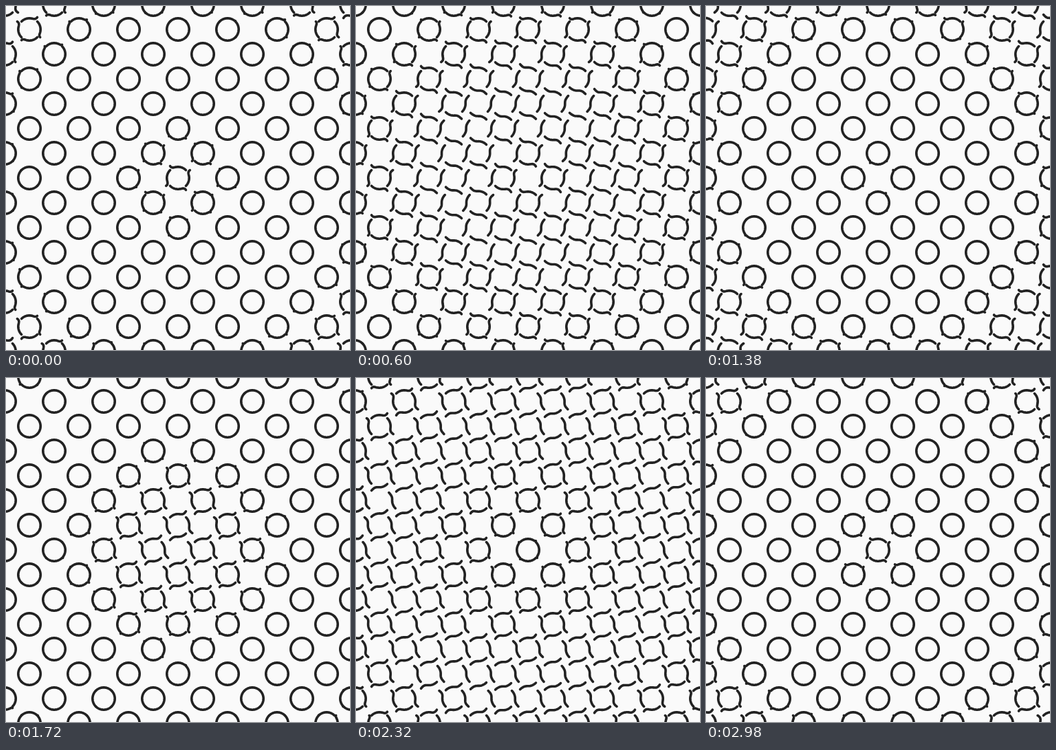
An HTML page with a canvas for the animation above (3 s loop, 500 by 500 pixels).

```html
<!DOCTYPE html>
<html lang="en">
<head>
<meta charset="utf-8">
<title>Rings and waves</title>
<style>
  html, body { margin: 0; width: 100%; height: 100%; overflow: hidden; background: #fafafa; }
  canvas { display: block; width: 500px; height: 500px; }
</style>
</head>
<body>
<canvas id="stage" width="500" height="500"></canvas>
<script>
const ctx = document.getElementById('stage').getContext('2d');
const SIZE = 500, MID = SIZE / 2;
const LOOP = 3000, HALF = LOOP / 2, STEP = 20;
const CELL = 36, GAP = CELL / 2, RADIUS = 16.2;
const FLIP = 500;     // ms one point takes to flip
const SWEEP = 750;    // ms between the two ends of a strand
const SPREAD = 2.8;   // ms of delay per pixel from the middle
const LEAD = 40;
const PARTS = 24;

const smooth = x => {
  x = Math.min(1, Math.max(0, x));
  return x * x * (3 - 2 * x);
};

// +1: bent round an even cell, -1: bent round its odd neighbour
function bend(ms) {
  const x = (((ms + HALF / 2) % LOOP) + LOOP) % LOOP;
  const side = x < HALF ? 1 : -1;
  const since = x % HALF - HALF / 2;
  return side * (1 - 2 * smooth(since / FLIP + 0.5));
}

// Four strands round every even cell
const strands = [];
for (let i = -8; i <= 8; i++) {
  for (let j = -8; j <= 8; j++) {
    if ((i + j) % 2) continue;
    for (let k = 0; k < 4; k++) {
      const turn = k * Math.PI / 2;
      const x = i * CELL, y = j * CELL;
      const dist = Math.hypot(x + GAP * Math.sin(turn), y - GAP * Math.cos(turn));
      strands.push({ x, y, turn, delay: SPREAD * (dist - GAP) });
    }
  }
}

function drawStrand({ x, y, turn, delay }, t) {
  const at = t + LEAD - delay;
  const base = -GAP + (GAP - RADIUS) * bend(at - SWEEP / 2);
  ctx.save();
  ctx.translate(MID + x, MID + y);
  ctx.rotate(turn);
  ctx.beginPath();
  for (let n = 0; n <= PARTS; n++) {
    const u = n / PARTS;
    const angle = (u - 0.5) * Math.PI / 2;
    const rise = RADIUS * (1 - Math.cos(angle)) * bend(at - SWEEP * u);
    ctx.lineTo(RADIUS * Math.sin(angle), base + rise);
  }
  ctx.stroke();
  ctx.restore();
}

function draw(t) {
  ctx.fillStyle = '#fafafa';
  ctx.fillRect(0, 0, SIZE, SIZE);
  ctx.strokeStyle = '#222';
  ctx.lineWidth = 3.6;
  ctx.lineCap = ctx.lineJoin = 'round';
  for (const s of strands) drawStrand(s, t);
}

const start = performance.now();
function tick() {
  const t = (performance.now() - start) % LOOP;
  draw(Math.floor(t / STEP) * STEP);
  requestAnimationFrame(tick);
}
tick();
</script>
</body>
</html>
```
